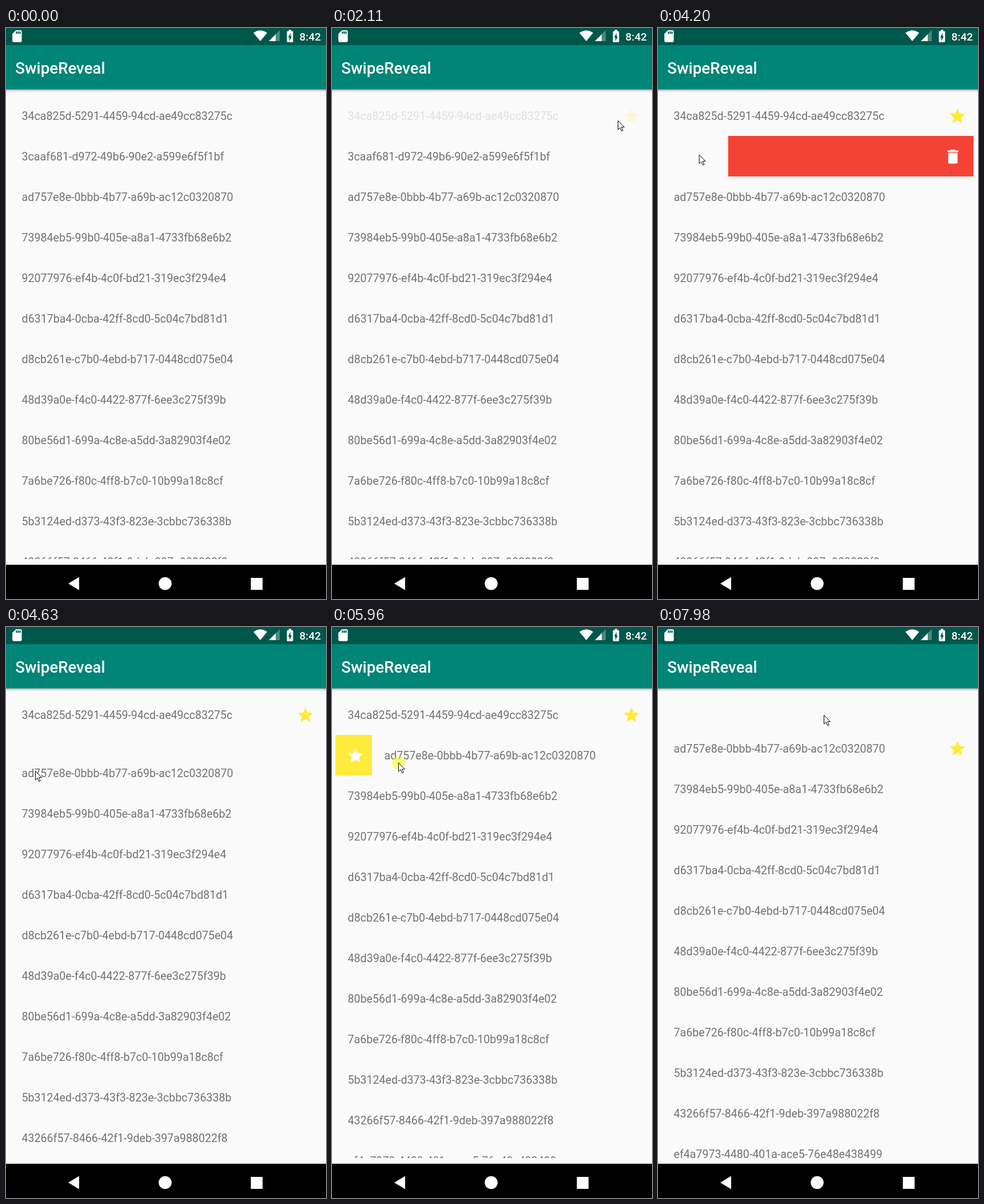
Animation of 560x1000 px, one loop 8000 ms. Source, as an HTML page with a canvas:

```html
<!DOCTYPE html>
<html lang="en">
<head>
<meta charset="utf-8">
<title>SwipeReveal</title>
<style>
html, body { margin: 0; width: 100%; height: 100%; overflow: hidden; background: #fafafa; }
canvas { display: block; width: 560px; height: 1000px; }
</style>
</head>
<body>
<canvas id="stage" width="560" height="1000"></canvas>
<script>
const g = document.getElementById('stage').getContext('2d');
const LOOP = 8000, LEFT = 6, RIGHT = 552, TOP = 118, BOTTOM = 930, ROW = 71;
const SLOP = 16, FLY = 100, SETTLE = 330, SHIFT = 250;
const WHITE = '#fff', YELLOW = '#ffeb3b', RED = '#f44336', ICON = 1.362;

const ids = [
  '34ca825d-5291-4459-94cd-ae49cc83275c', '3caaf681-d972-49b6-90e2-a599e6f5f1bf',
  'ad757e8e-0bbb-4b77-a69b-ac12c0320870', '73984eb5-99b0-405e-a8a1-4733fb68e6b2',
  '92077976-ef4b-4c0f-bd21-319ec3f294e4', 'd6317ba4-0cba-42ff-8cd0-5c04c7bd81d1',
  'd8cb261e-c7b0-4ebd-b717-0448cd075e04', '48d39a0e-f4c0-4422-877f-6ee3c275f39b',
  '80be56d1-699a-4c8e-a5dd-3a82903f4e02', '7a6be726-f80c-4ff8-b7c0-10b99a18c8cf',
  '5b3124ed-d373-43f3-823e-3cbbc736338b', '43266f57-8466-42f1-9deb-397a988022f8',
  'ef4a7973-4480-401a-ace5-76e48e438499'
];

// A swipe to the right (dir 1) adds a star, one to the left (dir -1) deletes the row.
const swipes = [
  { row: 0, dir: 1, press: 930, release: 1780 },
  { row: 1, dir: -1, press: 2860, release: 4165 },
  { row: 2, dir: 1, press: 5290, release: 6380 },
  { row: 0, dir: -1, press: 7300, release: 7583 }
];

// Pointer moves, each accelerating from where the last one ended
const moves = [
  { from: 0, to: 130, x: 478, y: 998 },
  { from: 130, to: 720, x: 190, y: 48 },
  { from: 720, to: 930, x: 148, y: 152 },
  { from: 930, to: 1780, x: 500, y: 162 },
  { from: 2320, to: 2730, x: 452, y: 224 },
  { from: 2860, to: 4165, x: 72, y: 221 },
  { from: 4165, to: 4630, x: 51, y: 252 },
  { from: 4630, to: 5290, x: 36, y: 238 },
  { from: 5290, to: 6100, x: 143, y: 237 },
  { from: 6100, to: 6430, x: 517, y: 225 },
  { from: 6810, to: 6950, x: 547, y: 248 },
  { from: 6950, to: 7300, x: 500, y: 152 },
  { from: 7300, to: 7750, x: 290, y: 154 }
];

const star = new Path2D('M12 17.27L18.18 21l-1.64-7.03L22 9.24l-7.19-.61L12 2 9.19 8.63 2 9.24l5.46 4.73L5.82 21z');
const bin = new Path2D('M6 19c0 1.1.9 2 2 2h8c1.1 0 2-.9 2-2V7H6v12zM19 4h-3.5l-1-1h-5l-1 1H5v2h14V4z');
const card = new Path2D('M18 2h-8L4 8v12c0 1.1.9 2 2 2h12c1.1 0 2-.9 2-2V4c0-1.1-.9-2-2-2zM12 8h-2V4h2zM15 8h-2V4h2zM18 8h-2V4h2z');
const battery = new Path2D('M15.67 4H14V2h-4v2H8.33C7.6 4 7 4.6 7 5.33v15.33C7 21.4 7.6 22 8.33 22h7.33c.74 0 1.34-.6 1.34-1.33V5.33C17 4.6 16.4 4 15.67 4zM11 20v-5.5H9L13 7v5.5h2L11 20z');
const wifi = new Path2D('M445 23L433 8.5Q445 0 457 8.5z');
const signal = new Path2D('M460 23L479 4v19z');
const strength = new Path2D('M460 23L472 11v12z');
const back = new Path2D('M109 973l19-11.5v23z');
const arrow = new Path2D('M.5.5V16l3.6-3.4 2.6 5.9 2.5-1.1-2.6-5.7h4.9z');

const span = (t, a, b) => Math.max(0, Math.min(1, (t - a) / (b - a)));
const mix = (a, b, k) => a + (b - a) * k;

function pointer(t) {
  let { x, y } = moves[0];
  for (const m of moves) {
    const k = span(t, m.from, m.to) ** 1.55;
    x = mix(x, m.x, k);
    y = mix(y, m.y, k);
  }
  return { x, y };
}

function offset(s, t) {
  if (t < s.press || t >= s.release + SETTLE) return 0;
  const pulled = (pointer(Math.min(t, s.release)).x - pointer(s.press).x) * s.dir - SLOP;
  return s.dir * mix(Math.max(0, pulled), RIGHT - LEFT, span(t, s.release, s.release + FLY));
}

function rect(x, y, w, h, color) {
  g.fillStyle = color;
  g.fillRect(x, y, w, h);
}

function clip(x, y, w, h) {
  g.save();
  g.beginPath();
  g.rect(x, y, w, h);
  g.clip();
}

function text(str, x, y, size, color, weight = 400) {
  g.font = `${weight} ${size}px Roboto, sans-serif`;
  g.fillStyle = color;
  g.fillText(str, x, y);
}

function icon(shape, color, x = 0, y = 0, scale = 1) {
  g.save();
  g.translate(x, y);
  g.scale(scale, scale);
  g.fillStyle = color;
  g.fill(shape, 'evenodd');
  g.restore();
}

function disc(x, y, r, color) {
  g.fillStyle = color;
  g.beginPath();
  g.arc(x, y, r, 0, 7);
  g.fill();
}

function reveal(dx, y) {
  const x = dx > 0 ? LEFT : RIGHT + dx, w = Math.abs(dx);
  clip(x, y, w, ROW);
  rect(x, y, w, ROW, dx > 0 ? YELLOW : RED);
  if (dx > 0) icon(star, WHITE, 24.7, y + 20, ICON);
  else icon(bin, WHITE, 499.7, y + 20, ICON);
  g.restore();
}

function list(t) {
  clip(LEFT, TOP, RIGHT - LEFT, BOTTOM - TOP);
  let y = TOP;
  ids.forEach((id, row) => {
    let dx = 0, alpha = 1, starred = false, height = ROW;
    for (const s of swipes.filter(s => s.row === row)) {
      const end = s.release + SETTLE;
      dx += offset(s, t);
      if (t < end) continue;
      if (s.dir > 0) {
        starred = true;
        alpha = span(t, end - 20, end + 90);
      } else {
        alpha = 0;
        height = ROW * (1 + Math.cos(Math.PI * span(t, end, end + SHIFT))) / 2;
      }
    }
    if (dx) reveal(dx, y);
    g.globalAlpha = alpha;
    text(id, 27.6 + dx, y + 43.4, 19.58, '#737373');
    if (starred) icon(star, YELLOW, 507.7 + dx, y + 20, ICON);
    g.globalAlpha = 1;
    y += height;
  });
  g.restore();
}

function bars() {
  const shade = g.createLinearGradient(0, 107, 0, 113);
  shade.addColorStop(0, 'rgba(0,0,0,.42)');
  shade.addColorStop(.4, 'rgba(0,0,0,.14)');
  shade.addColorStop(1, 'rgba(0,0,0,0)');
  rect(0, 107, 560, 6, shade);
  rect(0, 30, 560, 77.4, '#008577');
  rect(0, 0, 560, 30, '#00574b');
  text('SwipeReveal', 16.3, 79.8, 27.7, WHITE, 500);
  text('8:42', 513.5, 21.8, 19.06, WHITE, 500);

  icon(card, WHITE, 7, 2, 1.03);
  icon(wifi, WHITE);
  icon(signal, 'rgba(255,255,255,.3)');
  icon(strength, WHITE);
  icon(battery, WHITE, 484, 1.2, 1.08);

  rect(0, 940, 560, 60, '#000');
  icon(back, WHITE);
  disc(278.5, 973, 11.3, WHITE);
  rect(428.5, 963, 20.5, 21, WHITE);
}

function cursor(t) {
  if (t < moves[0].to) return;
  const { x, y } = pointer(t);
  if (swipes.some(s => t >= s.press && t < s.release)) disc(x + .5, y + .5, 11.5, 'rgba(255,255,0,.5)');
  g.save();
  g.translate(x, y);
  g.fillStyle = WHITE;
  g.fill(arrow);
  g.strokeStyle = '#000';
  g.stroke(arrow);
  g.restore();
}

function draw(now) {
  const t = now % LOOP;
  rect(0, 0, 560, 1000, '#fafafa');
  list(t);
  bars();
  cursor(t);
  requestAnimationFrame(draw);
}
requestAnimationFrame(draw);
</script>
</body>
</html>
```
